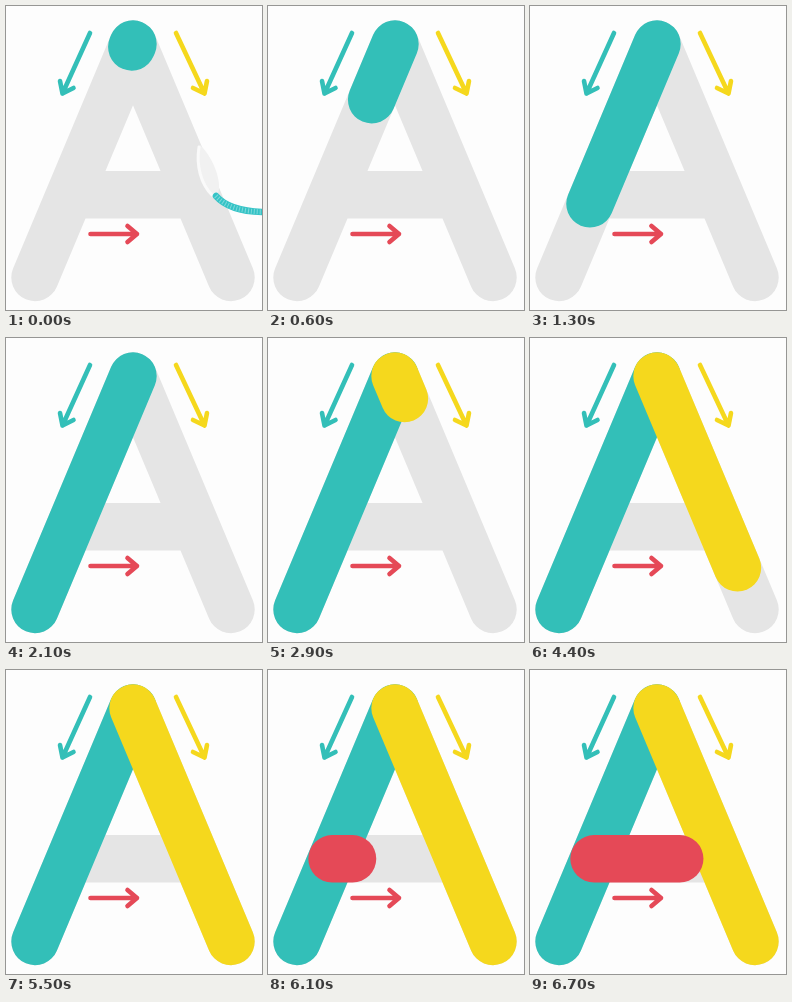
An HTML page that plays this animation: 256 px wide and 304 px high, repeating every 6800 ms.

```html
<!DOCTYPE html>
<html lang="en">
<head>
<meta charset="utf-8">
<title>Tracing the letter A</title>
<style>
  html, body { margin: 0; width: 100%; height: 100%; overflow: hidden; background: #fdfdfd; }
  svg { display: block; }
  path { fill: none; stroke-linecap: round; stroke-linejoin: round; }
  .letter { stroke-width: 47.4; }
  .arrow { stroke-width: 4.6; }
  .grey { stroke: #e5e5e5; }
  .teal { stroke: #33bfb8; }
  .yellow { stroke: #f5d81d; }
  .red { stroke: #e54957; }
</style>
</head>
<body>
<svg width="256" height="304" viewBox="0 0 256 304">
  <path class="letter grey" d="M29 271.5L127 38L225 271.5M64 188.8H190"/>

  <g id="tool">
    <path d="M194 139C203 147 214 167 213 183Q212 191 207 190C195 180 188 160 194 139Z" style="fill:#f1f1f1"/>
    <path d="M193 141C190 160 195 178 206 189" stroke="#fafafa" stroke-width="3"/>
    <path d="M210 190Q224 206 260 206" stroke="#35c3c6" stroke-width="6.5"/>
    <path d="M210 190Q224 206 260 206" stroke="#7ed9da" stroke-width="5" style="stroke-linecap:butt" stroke-dasharray="1 2"/>
  </g>

  <path class="letter teal" id="left"/>
  <path class="letter yellow" id="right"/>
  <path class="letter red" id="bar"/>

  <path class="arrow teal" d="M84 27L56.5 87.5M54 75L56.5 87.5L67.5 82"/>
  <path class="arrow yellow" d="M170 27L198.5 87.5M187 82L198.5 87.5L201 75"/>
  <path class="arrow red" d="M84.5 228H131M121.5 220L131 228L121.5 236"/>
</svg>
<script>
const LOOP = 6800, STEP = 100;
const $ = id => document.getElementById(id);

// Each stroke appears at `show`, eases from `from` to `to`, and is complete at `done`.
const strokes = [
  { el: $('left'), a: [127, 38], b: [29, 271.5], show: 0, from: -170, to: 2200, done: 2100 },
  { el: $('right'), a: [127, 38], b: [225, 271.5], show: 2500, from: 2320, to: 5200, done: 5100 },
  { el: $('bar'), a: [64, 188.8], b: [190, 188.8], show: 5800, from: 5650, to: 7350, done: LOOP }
];

const ease = u => (1 - Math.cos(Math.PI * u)) / 2;

function draw(t) {
  for (const { el, a, b, show, from, to, done } of strokes) {
    const p = t >= done ? 1 : ease((t - from) / (to - from));
    const end = a.map((v, i) => v + (b[i] - v) * p);
    el.setAttribute('d', t < show ? '' : `M${a}L${end}`);
  }
  $('tool').style.display = t < STEP ? '' : 'none';
}

const start = performance.now();
function tick() {
  const t = (performance.now() - start) % LOOP;
  draw(Math.floor(t / STEP) * STEP);
  requestAnimationFrame(tick);
}
tick();
</script>
</body>
</html>
```
